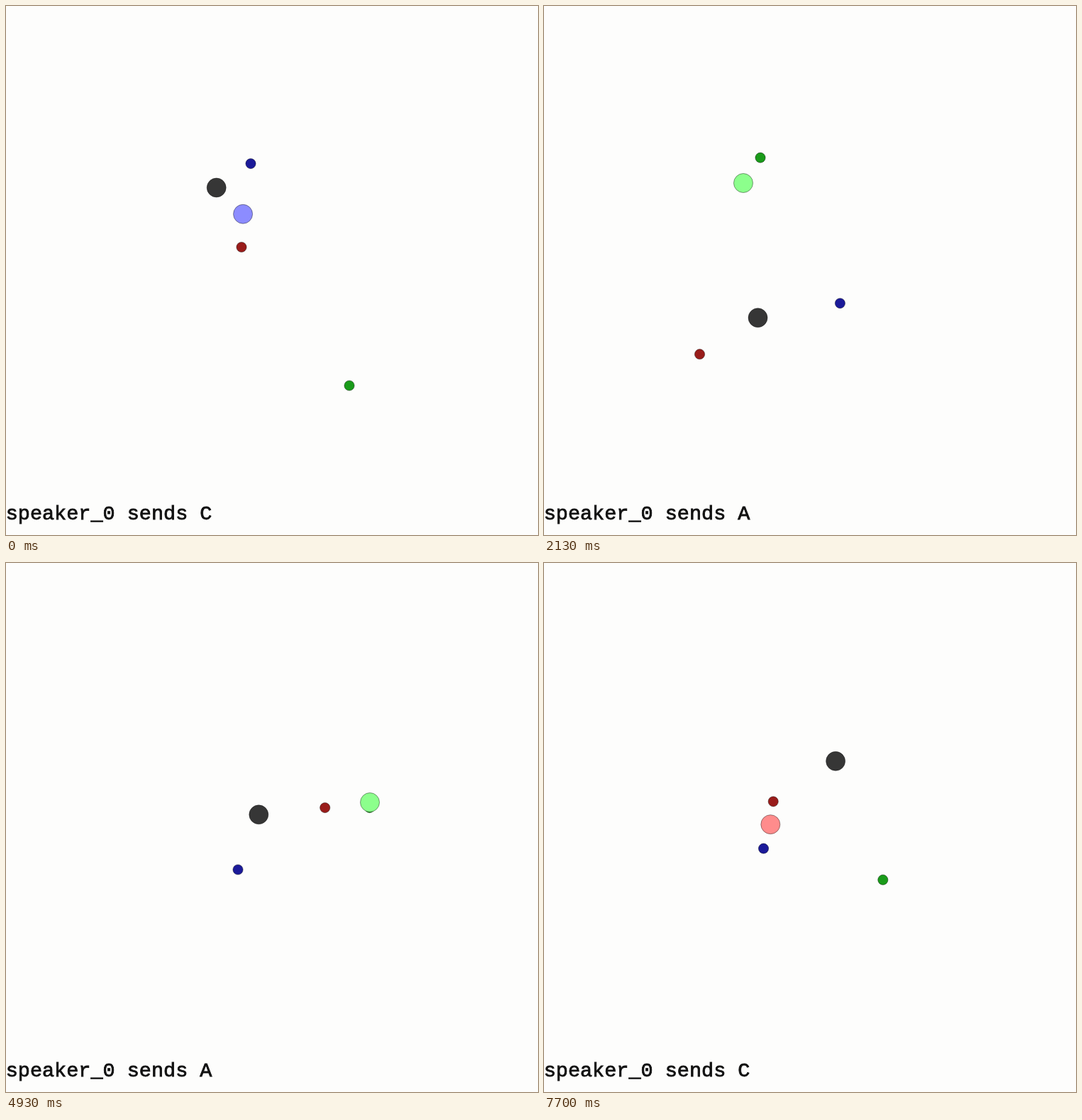
An HTML page with a canvas for the animation above (7.73 s loop, 750 by 747 pixels).

```html
<!DOCTYPE html>
<html lang="en">
<head>
<meta charset="utf-8">
<title>Speaker and listener</title>
<style>
html, body { margin: 0; width: 100%; height: 100%; overflow: hidden; background: #fdfdfc; }
canvas { display: block; }
</style>
</head>
<body>
<canvas id="stage" width="750" height="747"></canvas>
<script>
const ctx = document.getElementById('stage').getContext('2d');
const LOOP = 7730;
const EPISODE = 2465;   // length of one episode
const ELAPSED = 1805;   // time already spent in the first one
const PAUSE = 100;      // the listener waits before it moves
const GLIDE = 2200;     // usual time to reach the goal

const LANDMARKS = ['#991c1a', '#1a9b1a', '#1b1a99'];
const TINTS = ['#ff8c8c', '#8cff8c', '#8c8cff'];

// marks: red, green, blue; goal: index of the wanted mark
const episodes = [
  { letter: 'C', goal: 2, speaker: [296.7, 256.5],
    marks: [[332, 340.5], [484, 536], [345, 222.6]],
    from: [321, 333], to: [336, 288] },
  { letter: 'A', goal: 1, speaker: [301.5, 440.2],
    marks: [[219.5, 491.7], [305, 214.2], [417.4, 419.8]],
    from: [266, 265], to: [288, 243] },
  { letter: 'A', goal: 1, speaker: [356.3, 355.3],
    marks: [[449.7, 345.6], [512.6, 345.6], [327, 433]],
    from: [290.5, 267], bend: [485, 263], to: [513, 338], glide: 1300 },
  { letter: 'C', goal: 0, speaker: [411.1, 279.8],
    marks: [[323.2, 336.8], [477.8, 447.4], [309.5, 403.2]],
    from: [366.7, 329.3], to: [318.3, 370] }
];

function smooth(s) {
  s = Math.min(Math.max(s, 0), 1);
  return s * s * (3 - 2 * s);
}

// eased walk along a quadratic curve, straight when there is no bend
function listener({ from, to, bend, glide = GLIDE }, age) {
  const u = smooth((age - PAUSE) / glide), v = 1 - u;
  return from.map((a, k) => {
    const mid = bend ? bend[k] : (a + to[k]) / 2;
    return a * v * v + 2 * mid * u * v + to[k] * u * u;
  });
}

function disc([x, y], r, fill) {
  ctx.beginPath();
  ctx.arc(x, y, r, 0, Math.PI * 2);
  ctx.fillStyle = fill;
  ctx.fill();
  ctx.strokeStyle = 'rgba(0, 0, 0, 0.4)';
  ctx.lineWidth = 1;
  ctx.stroke();
}

function label(text) {
  ctx.font = '28.5px "Courier New", "Liberation Mono", monospace';
  ctx.fillStyle = ctx.strokeStyle = '#111';
  ctx.lineWidth = 0.8;
  ctx.fillText(text, -0.3, 725);
  ctx.strokeText(text, -0.3, 725);
}

function draw(t) {
  const clock = t + ELAPSED;
  const ep = episodes[Math.floor(clock / EPISODE)];
  ctx.fillStyle = '#fdfdfc';
  ctx.fillRect(0, 0, 750, 747);
  ep.marks.forEach((p, i) => disc(p, 7.1, LANDMARKS[i]));
  disc(ep.speaker, 13.5, '#363636');
  disc(listener(ep, clock % EPISODE), 13.5, TINTS[ep.goal]);
  label('speaker_0 sends ' + ep.letter);
}

const start = performance.now();
function tick() {
  draw((performance.now() - start) % LOOP);
  requestAnimationFrame(tick);
}
tick();
</script>
</body>
</html>
```
